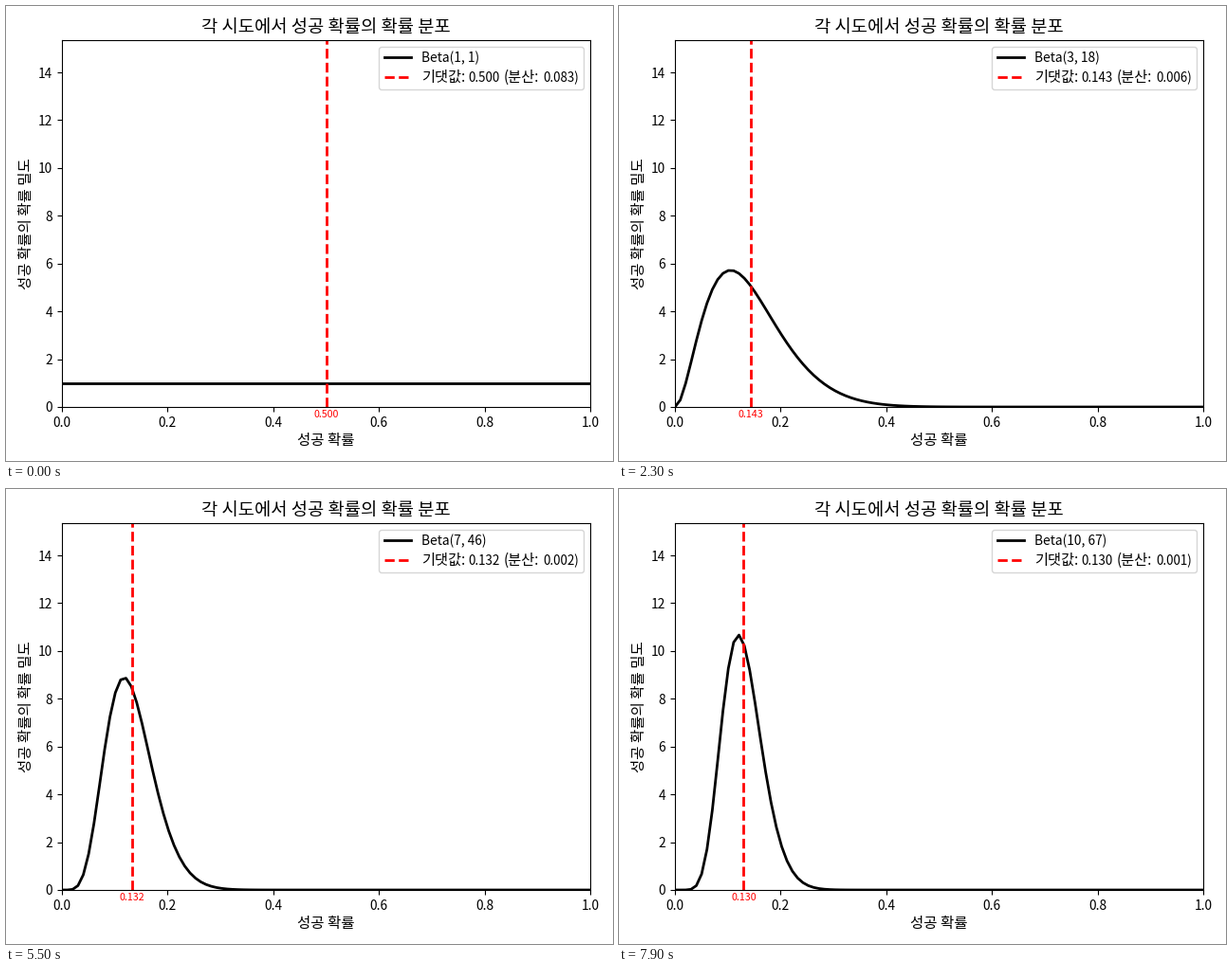
These frames come from a looping animation (640x480 px, 8 s). A matplotlib script:

```python
import math

import numpy as np
import matplotlib.pyplot as plt
from matplotlib.animation import FuncAnimation
from matplotlib.patches import FancyBboxPatch

W, H, DPI = 640, 480, 100
LEFT, RIGHT, TOP, BOTTOM = 59, 616, 36, 423
FRAMES, INTERVAL, HOLD = 80, 100, 4
SUCCESSES = (4, 13, 26, 35, 42, 46, 55, 59, 71)  # trials that succeeded

plt.rcParams["font.family"] = "Noto Sans CJK JP"

fig = plt.figure(figsize=(W / DPI, H / DPI), dpi=DPI, facecolor="white")

# Plot area
ax = fig.add_axes([LEFT / W, 1 - BOTTOM / H, (RIGHT - LEFT) / W, (BOTTOM - TOP) / H])
ax.set_xlim(0, 1)
ax.set_ylim(0, 15.35)
ax.set_yticks(range(0, 15, 2))
ax.tick_params(labelsize=9.9)

x = np.linspace(0, 1, 100)
curve, = ax.plot(x, np.ones_like(x), color="black", lw=2)
mean_line = ax.axvline(0.5, color="red", ls="--", lw=2)
mean_tag = ax.text(0.5, -0.45, "", color="red", size=7.7, ha="center")

# Overlay in pixel coordinates, y pointing down
page = fig.add_axes([0, 0, 1, 1])
page.set_xlim(0, W)
page.set_ylim(H, 0)
page.axis("off")


def label(px, py, text, size, **kw):
    return page.text(px, py, text, size=size, va="baseline",
                     rotation_mode="anchor", **kw)


label(337, 28, "각 시도에서 성공 확률의 확률 분포", 13.5, ha="center")
label(337, 463, "성공 확률", 11.2, ha="center")
label(26, 230, "성공 확률의 확률 밀도", 11.2, ha="center", rotation=90)

# Legend
page.add_patch(FancyBboxPatch((393.5, 43.5), 216, 45, lw=1, fc="white", ec="0.8",
                              alpha=0.8, boxstyle="round,pad=0,rounding_size=2.8"))
page.plot([399, 426.8], [54, 54], color="black", lw=2)
page.plot([399, 426.8], [75, 75], color="red", ls="--", lw=2)
beta_text = label(438, 59, "", 9.9)
label(438, 80, "기댓값:", 11)
mean_text = label(487.5, 80, "", 9.6)
label(525, 80, "(분산:", 11)
var_text = label(566.5, 80, "", 9.6)


def beta_pdf(a, b):
    scale = math.exp(math.lgamma(a + b) - math.lgamma(a) - math.lgamma(b))
    return scale * x ** (a - 1) * (1 - x) ** (b - 1)


def update(i):
    trials = max(0, i - HOLD)
    wins = sum(t <= trials for t in SUCCESSES)
    a, b = 1 + wins, 1 + trials - wins
    mean = a / (a + b)
    var = mean * (1 - mean) / (a + b + 1)

    curve.set_ydata(beta_pdf(a, b))
    mean_line.set_xdata([mean, mean])
    mean_tag.set_x(mean)
    mean_tag.set_text(f"{mean:.3f}")
    beta_text.set_text(f"Beta({a}, {b})")
    mean_text.set_text(f"{mean:.3f}")
    var_text.set_text(f"{var:.3f})")
    return curve, mean_line, mean_tag, beta_text, mean_text, var_text


anim = FuncAnimation(fig, update, frames=FRAMES, interval=INTERVAL,
                     init_func=lambda: update(0), repeat=True, repeat_delay=0)
plt.show()
```
